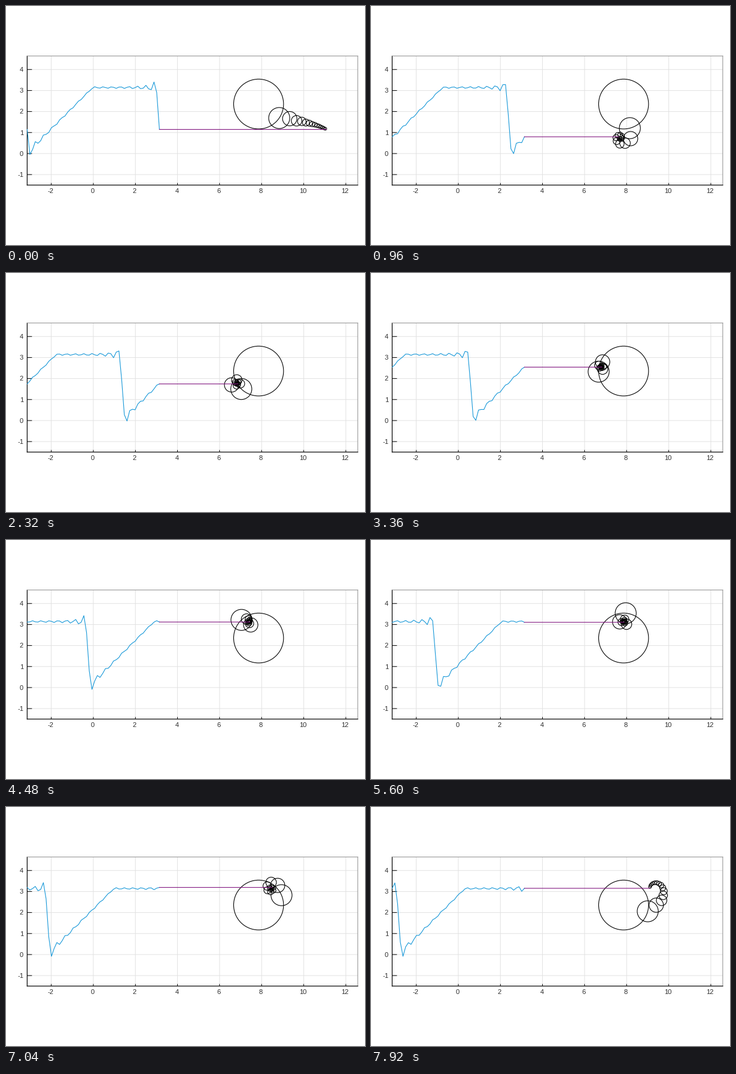
A matplotlib script for the animation above (8000 ms loop, 600 px wide and 400 px high).

```python
import numpy as np
import matplotlib.pyplot as plt
from matplotlib.animation import FuncAnimation
from matplotlib.patches import Circle

plt.rcParams["path.snap"] = False  # keep sub-pixel line positions

WIDTH, HEIGHT, DPI = 600, 400, 100
LEFT, RIGHT, TOP, BOTTOM = 35.4, 587.9, 83.7, 299.7
FRAMES, INTERVAL = 100, 80
START, STEP = 0.03, 0.06
PX = 72 / DPI  # one pixel in points
X_MIN, X_MAX = -np.pi, 4 * np.pi
Y_MIN, Y_MAX = -1.5, np.pi + 1.5
X_TICKS, Y_TICKS = np.arange(-2, 13, 2), np.arange(-1, 5)
SCALE = (RIGHT - LEFT) / (X_MAX - X_MIN)  # pixels per unit

# Fourier series of pi + min(x, 0) on [-pi, pi]
n = np.arange(1, 16)
a = np.where(n % 2, 2 / (np.pi * n**2), 0)
b = (-1.0) ** (n + 1) / n
radii = np.hypot(a, b)
mean = 3 * np.pi / 4
center_x = 2.5 * np.pi
xs = np.linspace(-np.pi, np.pi, 50)


def series(x):
    nx = np.outer(x, n)
    return mean + np.cos(nx) @ a + np.sin(nx) @ b


def joints(x):
    """Centres of all circles followed by the tip of the chain."""
    c, s = np.cos(n * x), np.sin(n * x)
    px = center_x + np.cumsum(np.r_[0, a * s - b * c])
    py = mean + np.cumsum(np.r_[0, a * c + b * s])
    return px, py


fig = plt.figure(figsize=(WIDTH / DPI, HEIGHT / DPI), dpi=DPI, facecolor="white")
ax = fig.add_axes([LEFT / WIDTH, 1 - BOTTOM / HEIGHT,
                   (RIGHT - LEFT) / WIDTH, (BOTTOM - TOP) / HEIGHT])
ax.set_xlim(X_MIN, X_MAX)
ax.set_ylim(Y_MIN, Y_MAX)
ax.set_xticks(X_TICKS)
ax.set_yticks(Y_TICKS)
ax.set_axisbelow(True)
ax.grid(color="#e2e2e2", linewidth=PX)
ax.tick_params(length=0, labelbottom=False, labelleft=False)
ax.vlines(X_TICKS, Y_MIN, Y_MIN + 3.5 / SCALE, color="black", linewidth=PX)
ax.hlines(Y_TICKS, X_MIN, X_MIN + 8 / SCALE, color="black", linewidth=PX)
for side in ("top", "right"):
    ax.spines[side].set(color="#8c8c8c", linewidth=PX)
for side in ("left", "bottom"):
    ax.spines[side].set(color="black", linewidth=1.2 * PX)


def label(x, y, value, align):
    fig.text(x / WIDTH, 1 - y / HEIGHT, str(value), ha=align, va="baseline",
             family="Liberation Sans", size=8, color="#2b2b2b")


for v in X_TICKS:
    label(LEFT + (v - X_MIN) * SCALE - 1.2, 313, v, "center")
for v in Y_TICKS:
    label(29, BOTTOM - (v - Y_MIN) * SCALE + 3.8, v, "right")

curve, = ax.plot([], [], color="#1597d8", linewidth=1.1 * PX, zorder=3)
circles = [ax.add_patch(Circle((0, 0), r, fill=False, edgecolor="black",
                               linewidth=1.1 * PX, zorder=4)) for r in radii]
link, = ax.plot([], [], color="#80147f", linewidth=1.1 * PX, zorder=5)


def update(frame):
    shift = START + STEP * frame
    curve.set_data(xs, series(xs + shift))
    px, py = joints(np.pi + shift)
    for circle, x, y in zip(circles, px, py):
        circle.center = x, y
    link.set_data([np.pi, px[-1]], [py[-1], py[-1]])
    return [curve, link, *circles]


anim = FuncAnimation(fig, update, frames=FRAMES, interval=INTERVAL,
                     repeat=True, repeat_delay=0)
plt.show()
```
